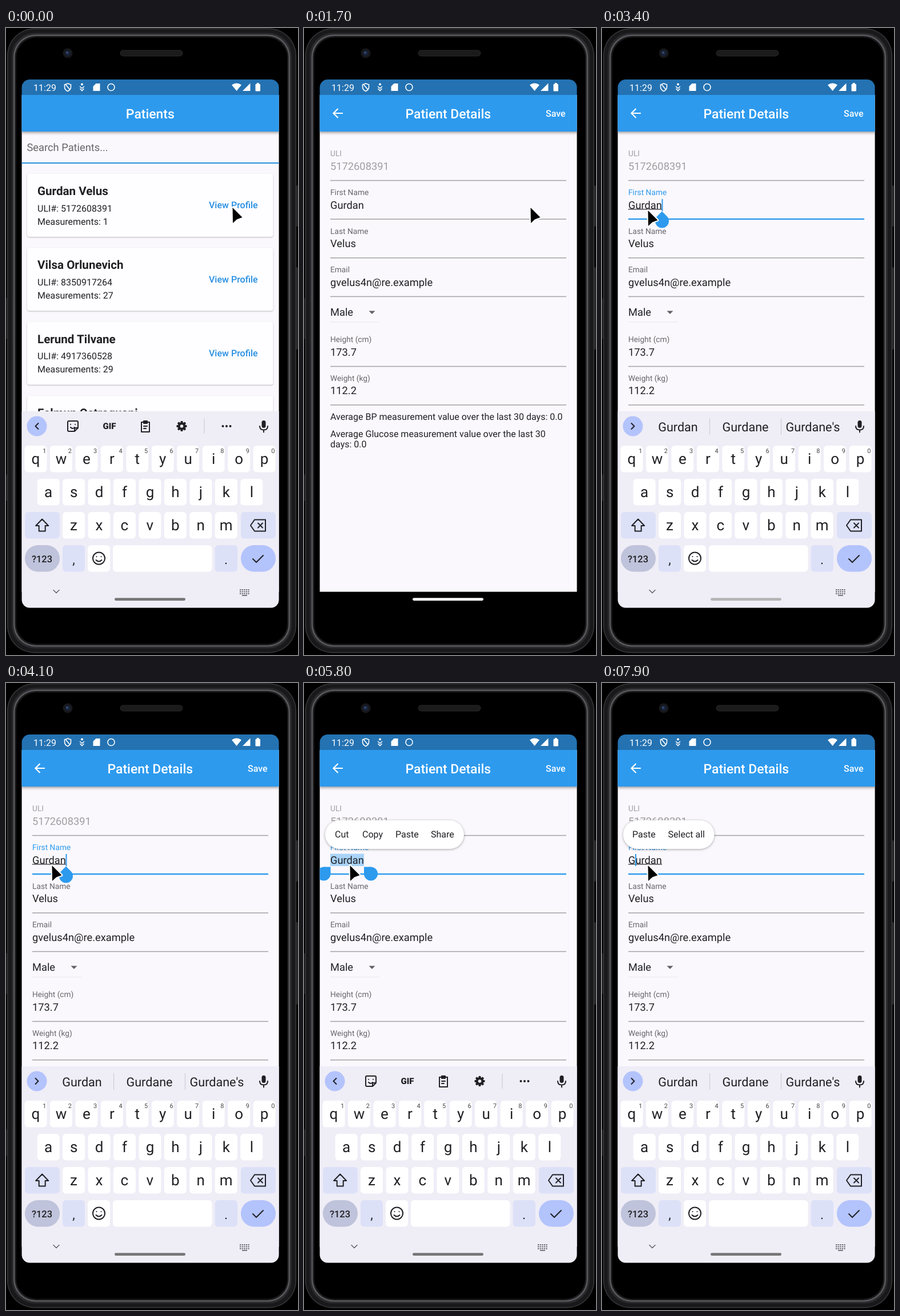
Animation of 511x1096 px, one loop 8000 ms. Source, as an HTML page:

```html
<!DOCTYPE html>
<html lang="en">
<head>
<meta charset="utf-8">
<title>Patients</title>
<style>
  html, body { margin: 0; width: 100%; height: 100%; overflow: hidden; background: #000; }
  svg { display: block; width: 100%; height: 100%; font-family: Roboto, sans-serif; text-rendering: geometricPrecision; }
  .bar { filter: drop-shadow(0 2px 2.5px #0006); }
  .card { filter: drop-shadow(0 1px 1.2px #0004); }
  .popup { filter: drop-shadow(0 1px 2px #0005); }
  .icon { fill: none; stroke: #202126; stroke-width: 2; stroke-linecap: round; stroke-linejoin: round; }
</style>
</head>
<body>
<svg id="stage" viewBox="0 0 511 1096" xmlns="http://www.w3.org/2000/svg"></svg>
<script>
const LOOP = 8000;
const BLUE = '#2d9aee', INK = '#202024', GREY = '#68666b', PAPER = '#faf8fc';
const FIRST = 'Gurdan', LAST = 'Velus', ULI = '5172608391';

const text = (x, y, str, size = 16.03, fill = INK, weight = 400, anchor = 'start') =>
  `<text x="${x}" y="${y}" font-size="${size}" fill="${fill}" font-weight="${weight}" text-anchor="${anchor}">${str}</text>`;
const mid = (x, y, str, size, fill, weight) => text(x, y, str, size, fill, weight, 'middle');
const rect = (x, y, w, h, fill, r = 0, extra = '') =>
  `<rect x="${x}" y="${y}" width="${w}" height="${h}" rx="${r}" fill="${fill}" ${extra}/>`;
const circle = (x, y, r, fill, extra = '') => `<circle cx="${x}" cy="${y}" r="${r}" fill="${fill}" ${extra}/>`;
const path = (d, fill, extra = '') => `<path d="${d}" fill="${fill}" ${extra}/>`;
const icon = (x, y, d, extra = '') => `<path class="icon" transform="translate(${x} ${y})" d="${d}" ${extra}/>`;
const group = (id, body, extra = '') => `<g id="${id}" ${extra}>${body}</g>`;

function phone() {
  const ring = (inset, fill, radius) =>
    rect(2 + inset, 0.5 + inset, 506 - 2 * inset, 1092 - 2 * inset, fill, radius);
  return rect(505, 275, 6, 72, '#252527', 2) + rect(505, 418, 6, 144, '#252527', 2) +
    rect(0, 472, 6, 72, '#1c1c1e', 2) + rect(0, 780, 6, 47, '#1c1c1e', 2) +
    ring(0, '#3a3a3d', 48) + ring(1.5, '#19191b', 46) + ring(8, '#2b2b2e', 41) +
    ring(11, '#58585d', 39) + ring(13.5, '#1a1a1c', 37) + ring(16, '#000', 35) +
    circle(108, 44, 8.5, '#17181c') + circle(108, 44, 4.5, '#18233b') + circle(107, 43, 2, '#33496f') +
    rect(200, 39, 109, 10, '#1b1b1c', 5, 'stroke="#29292b"');
}

function statusBar() {
  const line = 'stroke="#fff" stroke-width="1.6"';
  return rect(27, 90, 452, 27, '#2472b2') + text(48, 109.5, '11:29', 16.03, '#fff') +
    path('M108 97l5.5 2v4q0 5-5.5 7.500q-5.500-2.500-5.500-7.500v-4zM104.500 99l7.500 9', 'none', line) +
    circle(133, 98.5, 2, '#fff') + path('M129 102l4 3.500l4-3.500M129.500 106l3.500 3.500l3.500-3.500', 'none', line) +
    path('M157.500 97h7v13h-12v-8z', '#fff') + circle(184, 103.5, 6, 'none', line) +
    path('M395 99.500q8.500-6 17 0l-8.500 10.500zM414 110l13.500-13.500v13.500z', '#fff') +
    rect(436.5, 98, 8.5, 12.5, '#fff', 1) + rect(438.7, 96, 4, 3, '#fff');
}

const appBar = title => rect(27, 117, 452, 64, BLUE, 0, 'class="bar"') + mid(252.3, 158, title, 22.9, '#fff', 500);
const page = rect(27, 117, 452, 868.5, PAPER);

function patientList() {
  const patients = [
    [`${FIRST} ${LAST}`, ULI, 1], ['Vilsa Orlunevich', '8350917264', 27],
    ['Lerund Tilvane', '4917360528', 29], ['Felmun Ostroguani', '2706841953', 12]];
  const cards = patients.map(([name, uli, count], i) =>
    `<g transform="translate(0 ${i * 129.3})">` + rect(37, 255, 430.5, 110, '#fefdff', 4, 'class="card"') +
    text(55, 292, name, 20.6, INK, 700) + text(55, 320.8, `ULI#: ${uli}`) +
    text(55, 343.8, `Measurements: ${count}`) + text(355, 315.4, 'View Profile', 16.03, '#268fe2', 500) + '</g>').join('');
  return page + `<g clip-path="url(#listClip)">${cards}</g>` + appBar('Patients') +
    text(36.5, 214.5, 'Search Patients...', 18.3, GREY) + rect(27, 235, 452, 2, '#2b8fdc') +
    group('searchCaret', rect(36.5, 198, 2, 21, BLUE));
}

function field(label, value, y, faded) {
  return text(46, y + 5, label, 13.75, faded ? '#a09ea3' : GREY) +
    text(46, y + 28.7, value, 18.3, faded ? '#a09ea3' : INK) + rect(46, y + 46.5, 413, 1.5, '#a4a2a7');
}

const popup = (id, width, items) => group(id, rect(37, 240, width, 50, '#fff', 25, 'class="popup"') +
  items.map(([x, label]) => text(x, 270.3, label)).join(''));

function details() {
  const drop = (x, y, corner) => circle(x, y, 12, BLUE) + rect(corner, y - 12, 12, 12, BLUE);
  return page + appBar('Patient Details') +
    icon(59.5, 149, 'M8.500 0H-7.500M0-8L-8 0L0 8', 'style="stroke:#fff;stroke-width:2.2;stroke-linecap:butt;stroke-linejoin:miter"') +
    text(423, 154.500, 'Save', 16.03, '#fff', 500) +
    field('ULI', ULI, 219.3, true) +
    group('selection', rect(46, 298.5, 59, 21.5, '#a9d3f8')) +
    field('', FIRST, 286.9) + field('Last Name', LAST, 354.6) +
    field('Email', 'gvelus4n@re.example', 422.2) +
    text(46, 502.7, 'Male', 18.3) + path('M113.500 494.500h11l-5.500 5.500z', '#626065') + rect(46, 513.5, 86, 1, '#eae8ec') +
    field('Height (cm)', '173.7', 544.3) + field('Weight (kg)', '112.2', 611.7) +
    text(46, 685.4, 'Average BP measurement value over the last 30 days: 0.0') +
    text(46, 715, 'Average Glucose measurement value over the last 30') + text(46, 733.3, 'days: 0.0') +
    group('firstLabel', text(46, 291.9, 'First Name', 13.75, 'inherit')) +
    group('focus', rect(46, 332.8, 413, 2.4, BLUE)) +
    group('underline', rect(46, 316.3, 59, 1.2, INK)) +
    group('caret', rect(-1, 299, 2, 21, BLUE)) +
    group('caretHandle', path('M105 320.500l8.500 8.500a12 12 0 1 1-17 0z', BLUE)) +
    group('rangeHandles', drop(34.5, 333.5, 34.5) + drop(117, 333.5, 105)) +
    popup('editMenu', 243, [[54, 'Cut'], [102, 'Copy'], [160, 'Paste'], [222, 'Share']]) +
    popup('pasteMenu', 159.5, [[53, 'Paste'], [115.5, 'Select all']]);
}

function keyboard() {
  const PALE = '#dde1f8', STRONG = '#b3c3fc';
  const key = (x, y, w, fill = '#fff', r = 6) => rect(x, y, w, 46.5, fill, r);
  const letters = (row, x, y) => [...row].map((c, i) =>
    key(x + i * 44.45 - 19.5, y, 39) + mid(x + i * 44.45, y + 31.5, c, 26)).join('');
  const digits = [...'1234567890'].map((d, i) => mid(67.3 + i * 44.45, 743, d, 11, '#45454a')).join('');

  const teeth = [...Array(8)].map((_, i) =>
    rect(-2, -9, 4, 5, INK, 1, `transform="rotate(${i * 45})"`)).join('');
  const dots = [379.5, 386, 392.5].map(x => circle(x, 696, 2, INK)).join('');
  const tools = icon(54, 696, 'M2.500-5L-2.500 0L2.500 5') +
    icon(117, 696, 'M-7-9H7Q9-9 9-7V3L3 9H-7Q-9 9-9 7V-7Q-9-9-7-9M9 3H5Q3 3 3 5V9M-4-3v.1M4-3v.1M-4 2q4 4 7 0') +
    mid(181, 701, 'GIF', 15, INK, 900) +
    icon(244, 697, 'M-7-8H7V9H-7ZM-3-10H3V-6H-3ZM-3-1H3M-3 3H1') +
    `<g transform="translate(307.500 696)">${teeth}${circle(0, 0, 4.8, 'none', `stroke="${INK}" stroke-width="4"`)}</g>` +
    rect(346.5, 683, 1, 26, '#c6c4cc') + dots;
  const words = icon(54, 696, 'M-2.500-5L2.500 0L-2.500 5') +
    mid(133, 705, FIRST, 21.6) + mid(251, 705, FIRST + 'e', 21.6) + mid(369, 705, FIRST + "e's", 21.6) +
    rect(188, 682, 1, 29, '#c9c7cf') + rect(313, 682, 1, 29, '#c9c7cf');

  const keyDots = [...Array(15)].map((_, i) =>
    rect(409 + i % 5 * 3.6, 981 + Math.floor(i / 5) * 3.4, 2.2, 2, '#66646b')).join('');
  return rect(27, 670, 452, 344, '#efedf6') + circle(54, 696, 17.5, STRONG) +
    group('tools', tools) + group('words', words) +
    rect(447.5, 686, 7, 13, INK, 3.5) + icon(451, 696, 'M-7 0q0 6.500 7 6.500t7-6.500M0 7v3.500') +
    letters('qwertyuiop', 52, 730) + digits + letters('asdfghjkl', 74.2, 788) + letters('zxcvbnm', 118.5, 846) +
    key(33, 846, 61, PALE) + icon(63.2, 869, 'M0-10.500L-11 1H-5.500V10.500H5.500V1H11Z') +
    key(411, 846, 61, PALE) + icon(441, 869.5, 'M-6-10H13V10H-6L-13 0ZM0-4L8 4M8-4L0 4') +
    key(33, 904, 61, '#bfc3db', 23) + mid(63, 934, '?123', 16.5, INK, 500) +
    key(99, 904, 39, PALE) + mid(118.5, 937, ',', 23) +
    key(143, 904, 39) + icon(162.5, 927, 'M-10.500 0a10.500 10.500 0 1 1 21 0a10.500 10.500 0 1 1-21 0M-4-3v.1M4-3v.1M-5 3q5 5 10 0') +
    key(187, 904, 173.5) + key(365.5, 904, 39.5, PALE) + mid(385, 937, '.', 23) +
    key(411, 904, 61, STRONG, 23) + icon(441, 928, 'M-9 0L-3 6L9-6') +
    icon(88, 985, 'M-5-2.500L0 2.500L5-2.500', 'style="stroke:#66646b;stroke-width:1.600"') +
    keyDots + rect(413, 991, 9, 1.7, '#66646b');
}

document.getElementById('stage').innerHTML = `<defs>
    <clipPath id="screenClip">${rect(27.6, 90, 450, 923.5, '#000', 14)}</clipPath>
    <clipPath id="listClip">${rect(27, 237, 452, 433.5, '#000')}</clipPath>
  </defs>` + phone() +
  `<g clip-path="url(#screenClip)">` + group('list', patientList()) + group('details', details()) +
  statusBar() + group('keyboard', keyboard()) + rect(190, 996.3, 124, 4.6, '#fff', 2.3, 'id="pill"') + '</g>' +
  group('mouse', path('M0 0L0.500 27L7.500 20.500L17 17Z', '#000', 'stroke="#fff" stroke-width="4" stroke-linejoin="round" paint-order="stroke"'));

const part = {};
document.querySelectorAll('#stage [id]').forEach(el => part[el.id] = el);

const show = (id, on) => part[id].setAttribute('display', on ? 'inline' : 'none');
const move = (id, x, y) => part[id].setAttribute('transform', `translate(${x} ${y})`);
const progress = (t, from, to) => Math.min(1, Math.max(0, (t - from) / (to - from)));
const ease = p => p * p * (3 - 2 * p);
const between = (t, from, to) => t >= from && t < to;

// Moments of the taps, in ms
const OPEN = 1050, FOCUS = 3100, SELECT = 4200, DESELECT = 6200, STEP = 7500;

function draw(t) {
  const selected = between(t, SELECT, DESELECT);
  const focused = t >= FOCUS;

  show('searchCaret', between(t, 600, 1100));
  show('list', t < OPEN + 300);
  show('details', t > OPEN);
  part.details.setAttribute('opacity', ease(progress(t, OPEN, OPEN + 300)));

  part.firstLabel.setAttribute('fill', focused ? BLUE : GREY);
  show('focus', focused);
  show('underline', focused && !selected);
  show('selection', selected);
  show('rangeHandles', selected);
  show('editMenu', selected);
  show('pasteMenu', t >= DESELECT);
  show('caretHandle', between(t, FOCUS, SELECT));

  const lastTap = t >= STEP ? STEP : t >= DESELECT ? DESELECT : FOCUS;
  show('caret', focused && !selected && (t - lastTap) % 1000 < 500);
  move('caret', t >= STEP ? 59 : t >= DESELECT ? 47 : 105.5, 0);

  const hidden = t < 2000 ? ease(progress(t, 700, 950)) : 1 - ease(progress(t, FOCUS + 20, 3380));
  show('keyboard', hidden < 1);
  move('keyboard', 0, hidden * 344);
  show('tools', t < 2000 || selected);
  show('words', t > 2000 && !selected);

  const light = t < 2000 ? progress(t, 900, 1400) : 1 - progress(t, FOCUS, 3650);
  const shade = Math.round(118 + 137 * light);
  part.pill.setAttribute('fill', `rgb(${shade},${shade},${shade})`);

  const across = ease(progress(t, 1900, 2780)), left = ease(progress(t, 2800, 3080));
  move('mouse', 396.5 - 270 * across - 46 * left, 314 + 5 * across);
}

function frame(now) {
  draw(now % LOOP);
  requestAnimationFrame(frame);
}
draw(0);
requestAnimationFrame(frame);
</script>
</body>
</html>
```
